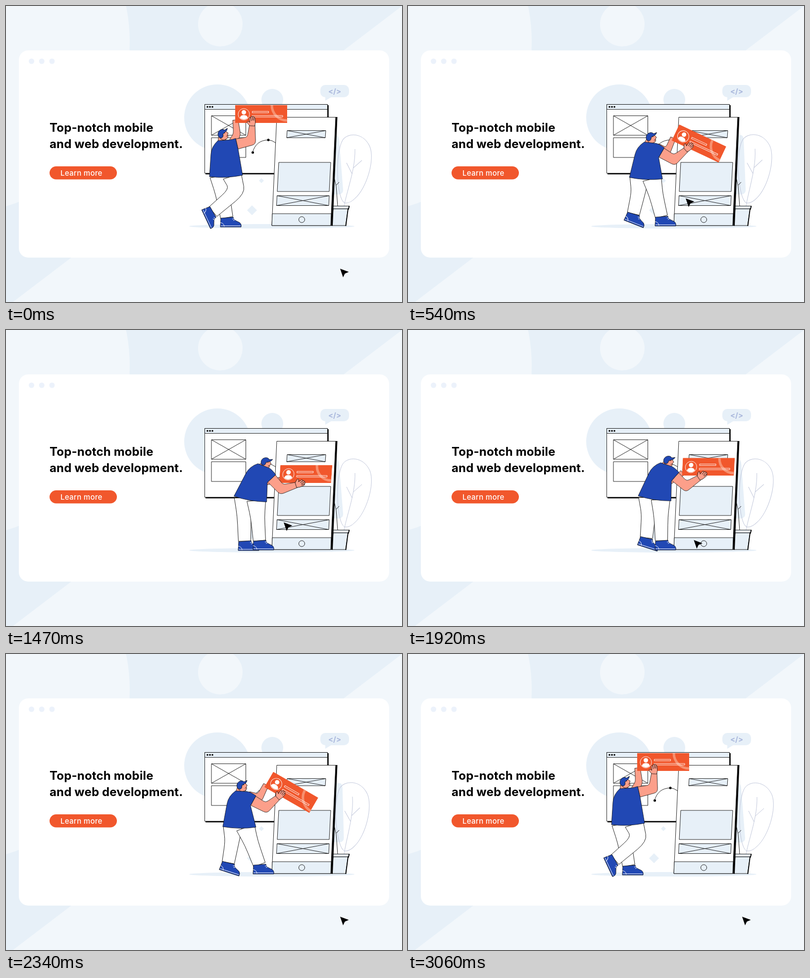
Write an HTML page that moves like this. It is 800 by 600 pixels and loops after 3090 ms.

```html
<!DOCTYPE html>
<html lang="en">
<head>
<meta charset="utf-8">
<title>Top-notch mobile and web development</title>
<style>
  html, body { margin: 0; width: 100%; height: 100%; overflow: hidden; background: #f2f7fb; }
  svg { display: block; width: 800px; height: 600px; }
  text { font-family: Inter, "Open Sans", sans-serif; }
  .back { fill: #f2f7fb; }
  .pale { fill: #e7f0f8; }
  .line, .page, .tint { stroke: #000; stroke-width: .85; stroke-linejoin: round; fill: none; }
  .page { fill: #fff; }
  .tint { fill: #e7f0f8; }
  .skin, .blue { stroke: #111; stroke-width: .8; stroke-linejoin: round; }
  .skin { fill: #fc9f8a; }
  .blue { fill: #2148b4; }
  .thin { fill: none; stroke: #fff; stroke-width: .9; }
  .leaf { fill: none; stroke: #c3c9dc; }
</style>
</head>
<body>
<svg viewBox="0 0 800 600">
  <defs>
    <g id="boot">
      <path class="blue" d="M-12 1L13-1C14 6 21 7 26 10Q30 13 29 19H-13Z"/>
      <path class="thin" d="M-13 10Q-6 11-5 18M-12 16.500H28M11 3l4-1M13 6l4-2"/>
    </g>
    <clipPath id="bannerClip"><rect x="-52.500" y="-18" width="105" height="36"/></clipPath>
  </defs>

  <!-- Backdrop -->
  <rect class="back" width="800" height="600"/>
  <path class="pale" d="M0 0H800L14 600H0Z"/>
  <circle class="back" cx="-98" cy="72" r="348"/>
  <circle class="back" cx="433" cy="37" r="45"/>
  <rect x="26" y="90" width="748" height="420" rx="19" fill="#fff"/>
  <path d="M51.500 112h.01m20.700 0h.01m20.700 0h.01" stroke="#ecf2fb" stroke-width="11" stroke-linecap="round"/>

  <!-- Copy -->
  <g font-size="24" font-weight="700" letter-spacing=".15">
    <text x="88" y="255">Top-notch mobile</text>
    <text x="88" y="288">and web development.</text>
  </g>
  <rect x="88" y="325" width="136" height="26.500" rx="13.250" fill="#f1572c"/>
  <text x="110" y="343.500" font-size="15" font-weight="500" letter-spacing=".3" fill="#fff">Learn more</text>

  <!-- Scenery -->
  <circle class="pale" cx="427" cy="226" r="67"/>
  <circle class="pale" cx="538" cy="190" r="22"/>
  <rect class="pale" x="635" y="160" width="58" height="25" rx="10"/>
  <path class="pale" d="M645 180V192L660 183Z"/>
  <text x="664" y="178" text-anchor="middle" font-size="15" font-weight="700" fill="#a9b7dc">&lt;/&gt;</text>
  <ellipse class="pale" cx="537" cy="446.500" rx="167" ry="4.500"/>

  <!-- Browser window -->
  <path d="M403 340H650.500V201" fill="none" stroke="#000" stroke-width="2.500"/>
  <rect class="page" x="401.500" y="199.500" width="248" height="139.500"/>
  <rect class="tint" x="401.500" y="199.500" width="248" height="10"/>
  <path d="M407 204.500h.01m5 0h.01m5 0h.01" stroke="#000" stroke-width="3.600" stroke-linecap="round"/>
  <path id="windowLines" class="line"/>
  <path class="line" d="M498 297Q505 272 530 271.500Q545 272 560 295"/>
  <path d="M498.500 297h.01M530 271.500h.01" stroke="#000" stroke-width="5" stroke-linecap="round"/>
  <path class="pale" d="M497 404l10 10l-10 10l-10-10ZM516 349l5 5l-5 5l-5-5Z"/>

  <!-- Plant -->
  <path id="blob" class="pale" d="M660 262H667Q672 262 673 272L681 372Q682 381 672 382H660Z"/>
  <g id="plant">
    <path class="leaf" d="M684 399C668 392 664 300 680 272C690 256 722 256 735 285C746 312 728 370 705 390Q694 401 684 399Z"/>
    <path class="leaf" d="M705 290C706 330 690 370 683 405M702 328L719 313M699 340L688 318"/>
  </g>
  <path class="line" d="M663 348L667 365L670 405M667.500 363L673 357"/>
  <path class="tint" d="M661 411H691L686 445H658Z"/>
  <path class="tint" d="M656 405.500H693.500L692 411H656Z"/>
  <path d="M693.500 405L692 411.500H691L686.500 446" fill="none" stroke="#000" stroke-width="1.800"/>

  <!-- Phone -->
  <path d="M665 225H669.500L660 445.500H656Z"/>
  <path class="page" d="M547 225.500H666L656 445H537Z"/>
  <path class="tint" d="M538 421H657L656 445H537Z"/>
  <circle class="line" cx="597.500" cy="433" r="6"/>
  <path class="tint" d="M568 252.500H646L645 267H567ZL645 267M567 267L646 252.500"/>
  <path class="tint" d="M551 317H656L653 376H548Z"/>
  <path class="tint" d="M547.500 384.500H653L652 404.500H546.500ZL652 404.500M546.500 404.500L653 384.500"/>
  <path id="phoneLines" class="line"/>

  <!-- Man and banner -->
  <path id="farArm" class="skin"/>
  <g id="banner" clip-path="url(#bannerClip)">
    <rect x="-52.500" y="-18" width="105" height="36" fill="#f1572c"/>
    <circle cx="52.500" cy="-18" r="31" fill="none" stroke="#f7906f" stroke-width="5"/>
    <circle class="thin" cx="-35" cy=".5" r="11.500"/>
    <circle cx="-35" cy="-3.500" r="4.500" fill="#fff"/>
    <path d="M-43 8Q-42 2-35 2T-27 8Q-35 14-43 8Z" fill="#fff"/>
    <path class="thin" d="M-18-5.500H15V-2.500H-18ZM-18 3H43.500V6H-18Z"/>
  </g>
  <path id="standLeg" class="page"/>
  <use id="standBoot" href="#boot"/>
  <path id="stepLeg" class="page"/>
  <use id="stepBoot" href="#boot"/>
  <path id="neck" class="skin"/>
  <g id="head">
    <path class="skin" d="M-8-3V4Q-7 11 1 11Q8 11 8 5L11 3L8-4Z"/>
    <path class="line" d="M4-1l2 0M4 7l3-1"/>
    <path class="blue" d="M-9 1C-11-12 6-14 8-6L15-6Q12-2 7-2L1-1Q-1 5-6 4Z"/>
  </g>
  <path id="nearArm" class="skin"/>
  <path id="torso" class="blue"/>
  <g id="hand">
    <path class="skin" d="M-2-5L3-10Q6-12 7-9L5-5L12-7Q15-7 14-4Q18-4 17-1Q19 1 16 2.500Q16 5 12 5.500L4 6L-2 5Z"/>
    <path class="line" d="M14-4L8-2.500M17-1L9 .5M16 2.500L9 3"/>
  </g>
  <path id="cursor" d="M0 0L17.500 6.500L9.500 10L6 17.500Z"/>
</svg>

<script>
const LOOP = 3090, REACH = 960, BACK = 2790;
const $ = id => document.getElementById(id);
const clamp = v => Math.max(0, Math.min(1, v));
const mix = (a, b, k) => a.map((v, i) => v + (b[i] - v) * k);
const add = (a, b) => [a[0] + b[0], a[1] + b[1]];
const sin = deg => Math.sin(deg * Math.PI / 180);
const turn = ([x, y], deg) => [x * sin(90 - deg) - y * sin(deg), x * sin(deg) + y * sin(90 - deg)];
const put = (id, x, y, angle = 0, rest = "") =>
  $(id).setAttribute("transform", `translate(${x} ${y}) rotate(${angle}) ${rest}`);
const draw = (id, d) => $(id).setAttribute("d", d);

// Key poses [time, ...values], joined smoothly without overshoot.
function track(...keys) {
  const slope = (i, j) => (keys[i + 1][j] - keys[i][j]) / (keys[i + 1][0] - keys[i][0]);
  const tangent = (i, j) => {
    if (i === 0 || i === keys.length - 1) return 0;
    const a = slope(i - 1, j), b = slope(i, j);
    return a * b > 0 ? 2 * a * b / (a + b) : 0;
  };
  return time => {
    let i = 0;
    while (i < keys.length - 2 && time > keys[i + 1][0]) i++;
    const span = keys[i + 1][0] - keys[i][0], k = clamp((time - keys[i][0]) / span);
    return keys[i].map((v, j) => v + (keys[i + 1][j] - v) * k * k * (3 - 2 * k)
      + span * k * (1 - k) * ((1 - k) * tangent(i, j) - k * tangent(i + 1, j))).slice(1);
  };
}

// Position and angle; the body angle is the lean of the back over the hips.
const banner = track([0, 515.5, 219, 0], [270, 535, 239.5, 12.6], [450, 576.5, 280.5, 30], [810, 607.5, 269.5, 0], [REACH, 605.5, 292, 0]);
const body = track([0, 444, 345, 0], [270, 453, 345, 0], [450, 471, 351, 7], [810, 500, 341, 20], [REACH, 493, 343, 25]);
const standFoot = track([0, 446, 429, 0], [270, 446, 429, 0], [450, 449, 423, 18], [810, 481, 418, 27], [REACH, 482, 428, 0]);
const stepFoot = track([0, 418, 417, 65], [270, 458, 413, 33], [450, 512, 427, 0]);

function normal(a, b) {
  const dx = b[0] - a[0], dy = b[1] - a[1], len = Math.hypot(dx, dy) || 1;
  return [-dy / len, dx / len];
}

// Tapered two-bone limb, rounded at the joint.
function limb(a, b, c, widths, round) {
  const n1 = normal(a, b), n2 = normal(b, c), sum = add(n1, n2), len = Math.hypot(...sum) || 1;
  const miter = Math.min(1.25, 2 / len) / len;
  const normals = [n1, sum.map(v => v * miter), n2];
  const side = sign => [a, b, c].map((p, i) => add(p, normals[i].map(v => sign * v * widths[i] / 2)));
  const edge = ([p, q, r]) => `${p}L${mix(q, p, round)}Q${q} ${mix(q, r, round)}L${r}`;
  return `M${edge(side(1))}L${edge(side(-1).reverse())}Z`;
}

// Elbow below the line from shoulder to wrist, from the two bone lengths.
function elbowOf(shoulder, wrist, upper, fore) {
  const d = Math.min(Math.hypot(wrist[0] - shoulder[0], wrist[1] - shoulder[1]), upper + fore);
  const along = (upper * upper - fore * fore + d * d) / (2 * d);
  const out = Math.sqrt(Math.max(0, upper * upper - along * along));
  return add(mix(shoulder, wrist, along / d), normal(shoulder, wrist).map(v => v * out));
}

// The knee pushes forward as the heel lifts.
function drawLeg(name, hip, foot, softness) {
  const ankle = foot.slice(0, 2);
  const knee = add(mix(hip, ankle, .42), [softness * sin(foot[2]), 0]);
  draw(name + "Leg", limb(hip, knee, ankle, [38, 28, 25], .35));
  put(name + "Boot", ...foot);
}

function drawMan(p) {
  const [hipX, hipY, lean] = body(p), [bx, by, tilt] = banner(p);
  const upper = (x, y) => add([hipX, hipY], turn([x, y], lean));
  const lower = (x, y) => add([hipX, hipY], turn([x, y], lean / 2));
  const onBanner = (x, y) => add([bx, by], turn([x, y], tilt));

  const farShoulder = upper(12, -66), farHand = onBanner(-52, 12);
  draw("farArm", limb(farShoulder, elbowOf(farShoulder, farHand, 22, 29), farHand, [16, 14, 11], .2));
  put("banner", bx, by, tilt, `skewX(${-4 * clamp((p - 600) / (REACH - 600))})`);

  drawLeg("stand", lower(-13, 0), standFoot(p), 8);
  drawLeg("step", lower(13, 0), stepFoot(p), 29);

  const nape = upper(-16, -72), head = add(nape, turn([10, -12], 1.8 * lean));
  draw("neck", `M${add(head, [-8, 0])}L${add(nape, [0, 3])}L${add(nape, [17, 4])}L${add(head, [6, 8])}Z`);
  put("head", ...head, lean * 1.1 - 33);

  const shoulder = upper(8, -62), wrist = onBanner(-18, 22), elbow = elbowOf(shoulder, wrist, 45, 32);
  const across = normal(shoulder, elbow), cuff = mix(shoulder, elbow, .33);
  const [cuffTop, cuffEnd] = [-11.5, 11.5].map(r => add(cuff, across.map(v => v * r)));
  draw("nearArm", limb(cuff, elbow, wrist, [21, 18, 11], .2));
  put("hand", ...wrist, Math.atan2(wrist[1] - elbow[1], wrist[0] - elbow[0]) * 180 / Math.PI);

  const back = upper(-29, -60), chest = upper(13, -74), hem = lower(-33, 1);
  draw("torso", `M${mix(back, hem, .25)}Q${back} ${nape}L${mix(nape, chest, .8)}Q${chest} ${cuffTop}`
    + `L${cuffEnd}L${lower(34, -2)}Q${lower(0, 5)} ${hem}Z`);
}

function drawCursor(t) {
  const ease = k => k < .5 ? 4 * k ** 3 : 1 - 4 * (1 - k) ** 3;
  const away = 1 - ease(clamp((t - 20) / 250)) + ease(clamp((t - 1700) / 600));
  const on = [561, 390], bend = [598, 484], off = [675, 532.5];
  put("cursor", ...mix(mix(on, bend, away), mix(bend, off, away), away));
}

function render(t) {
  const p = Math.max(0, Math.min(t, REACH, BACK - t));
  const sway = 3 * sin(180 * (1 - (1 - p / REACH) ** 1.8));
  $("plant").setAttribute("transform", `rotate(${-sway} 685 405)`);
  $("blob").setAttribute("transform", `rotate(${1.2 * sway} 675 400)`);
  drawMan(p);
  drawCursor(t);
}

// Wireframe parts
const box = (x, y, w, h) => `M${x} ${y}h${w}v${h}h${-w}Z`;
const cross = (x, y, w, h) => `M${x} ${y}l${w} ${h}m0 ${-h}l${-w} ${h}`;
const rows = (x, y, w, count, gap) => Array.from({ length: count }, (_, i) => `M${x} ${y + i * gap}h${w}`).join("");
const caption = (x, w) => box(x, 312.5, w, 13.5) + cross(x + 6.5, 315.5, 7, 7)
  + `M${x + 5} 319a5 5 0 1 0 10 0a5 5 0 1 0-10 0` + rows(x + 18, 317.5, w - 20, 2, 3.5);

draw("windowLines", box(415, 222.5, 69.5, 39.5) + cross(415, 222.5, 69.5, 39.5) + box(415, 267, 69.5, 40)
  + rows(436, 276, 29, 1) + rows(426, 286, 48, 4, 4.3) + box(491, 222.5, 145, 84.5) + caption(415, 69.5) + caption(491, 145));
draw("phoneLines", rows(595, 232, 24.5, 1) + rows(581, 329.5, 45, 1) + rows(565.5, 345.5, 73, 5, 4.4));

const start = performance.now();
function tick() {
  render((performance.now() - start) % LOOP);
  requestAnimationFrame(tick);
}
tick();
</script>
</body>
</html>
```
